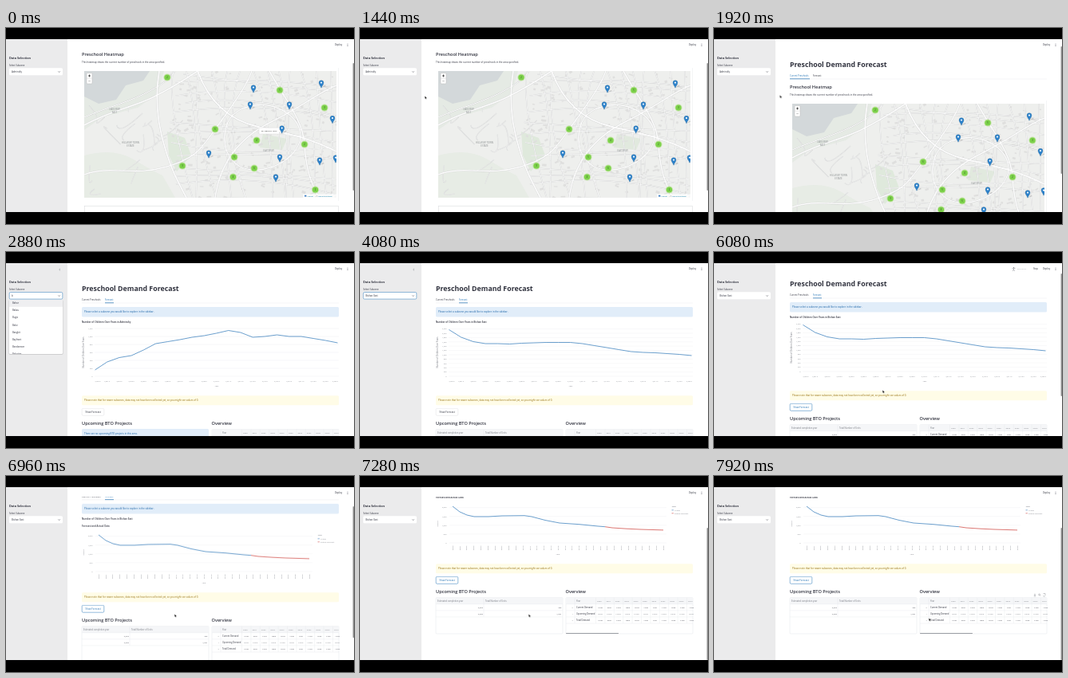
An HTML page for the animation above (8 s loop, 436 by 246 pixels).

```html
<!DOCTYPE html>
<html lang="en">
<head>
<meta charset="utf-8">
<title>Preschool dashboard</title>
<style>
  html, body { margin: 0; width: 100%; height: 100%; overflow: hidden; background: #000; }
  svg { display: block; width: 436px; height: 246px; }
  text { font-family: "Open Sans", "Noto Sans", sans-serif; white-space: pre; }
</style>
</head>
<body>
<svg id="stage" viewBox="0 0 436 246"></svg>
<script>
const LOOP = 8000, INK = '#31333f', BLUE = '#2272b4', GREY = '#777a82', RULE = '#e3e5e8';
const stage = document.getElementById('stage');

function add(parent, tag, attrs = {}, content) {
  const el = document.createElementNS('http://www.w3.org/2000/svg', tag);
  for (const key in attrs) el.setAttribute(key, attrs[key]);
  if (content !== undefined) el.textContent = content;
  parent.appendChild(el);
  return el;
}
const group = (parent, attrs) => add(parent, 'g', attrs);
const box = (parent, x, y, width, height, fill, more) =>
  add(parent, 'rect', { x, y, width, height, fill, ...more });
const path = (parent, d, stroke, width = 0.4, more) =>
  add(parent, 'path', { d, stroke, 'stroke-width': width, fill: 'none', ...more });
// y is the vertical middle of the text
const text = (parent, x, y, str, size = 2.8, fill = INK, more) =>
  add(parent, 'text', { x, y: y + size * 0.35, 'font-size': size, fill, ...more }, str);
const mid = { 'text-anchor': 'middle' }, end = { 'text-anchor': 'end' };
const bold = { 'font-weight': 700 }, semi = { 'font-weight': 600 };
const turned = (parent, x, y, str, size, fill) =>
  text(parent, 0, 0, str, size, fill, { ...mid, transform: `translate(${x} ${y}) rotate(-90)` });

function play(el, steps, easing = 'linear') {
  const list = steps.slice();
  if (list[0][0] > 0) list.unshift([0, list[0][1]]);
  if (list[list.length - 1][0] < LOOP) list.push([LOOP, list[list.length - 1][1]]);
  el.animate(list.map(([t, props]) => ({ offset: t / LOOP, easing, ...props })),
    { duration: LOOP, iterations: Infinity });
}
const move = (el, steps) =>
  play(el, steps.map(([t, x, y]) => [t, { transform: `translate(${x}px, ${y}px)` }]));
function show(el, ...spans) {
  const steps = spans[0][0] > 0 ? [[0, { opacity: 0 }]] : [];
  for (const [from, to] of spans) {
    steps.push([from, { opacity: 1 }]);
    if (to < LOOP) steps.push([to, { opacity: 0 }]);
  }
  play(el, steps, 'steps(1, end)');
}

let seed = 11;
const rand = () => (seed = (seed * 16807) % 2147483647) / 2147483647;
const jitter = n => (rand() - 0.5) * n;

box(stage, 77, 14, 359, 217, '#fff');
const page = group(stage);
move(page, [[0, 0, -41], [1600, 0, -41], [1760, 0, -17], [1920, 0, 0], [4240, 0, 0], [4720, 0, -5.5],
  [5120, 0, -5.5], [5920, 0, -6], [6840, 0, -6], [6960, 0, -34], [7200, 0, -70]]);

// Title and tabs
text(page, 95, 46, 'Preschool Demand Forecast', 8.8, INK, bold);
path(page, 'M95 64H417', RULE, 0.4);
for (const [from, to, on] of [[0, 2120, 0], [2120, LOOP, 1]]) {
  const tabs = group(page);
  text(tabs, 95, 60, 'Current Preschools', 2.65, on ? INK : BLUE);
  text(tabs, 124, 60, 'Forecast', 2.65, on ? BLUE : INK);
  path(tabs, on ? 'M124 63.8H135' : 'M95 63.8H120', BLUE, 0.7);
  show(tabs, [from, to]);
}

// Heatmap tab
function drawMap(parent) {
  const clip = add(add(stage, 'defs'), 'clipPath', { id: 'frame' });
  box(clip, 98, 54, 316, 159, '#000');
  const map = group(parent, { 'clip-path': 'url(#frame)' });
  box(map, 98, 54, 316, 159, '#eeefed');
  path(map, 'M98 54H198L190 82L165 100L120 112L98 128Z', 'none', 0, { fill: '#e5eae4' });
  path(map, 'M98 54H180L172 66L150 72L138 90L116 95L98 86Z', 'none', 0, { fill: '#d3d8da' });
  path(map, 'M98 160Q135 150 160 165T196 185L212 213H98Z', 'none', 0, { fill: '#e7ece5' });
  path(map, 'M202 130L224 138L232 160L214 180L204 160Z', 'none', 0, { fill: '#dfe9dc' });
  path(map, 'M322 133L352 139L346 153L318 150Z', 'none', 0, { fill: '#e1e9de' });

  for (let i = 0; i < 220; i++) {
    const x = 205 + rand() * 208, y = 55 + rand() * 157;
    box(map, x, y, 2 + rand() * 4, 1 + rand() * 2.2, '#dfdfde', { transform: `rotate(${jitter(70)} ${x} ${y})` });
  }
  const roads = [];
  const road = (d, w) => roads.push([d, w]);
  for (let i = 0; i < 13; i++) {
    const x = 212 + i * 16 + jitter(8), y = 56 + i * 13 + jitter(8);
    road(`M${x} 54Q${x + jitter(50)} ${110 + jitter(30)} ${x + 12 + jitter(30)} 213`, 0.8);
    road(`M${215 + jitter(20)} ${y}Q${310 + jitter(50)} ${y + jitter(50)} 414 ${y + 12 + jitter(20)}`, 0.8);
  }
  for (let i = 0; i < 16; i++) {
    const x = 100 + rand() * 92, y = 98 + rand() * 110;
    road(`M${x} ${y}q${jitter(30)} ${jitter(26)} ${8 + jitter(50)} ${jitter(44)}`, 0.5);
  }
  road('M98 122C130 104 160 99 184 87S222 66 240 54', 1.6);
  road('M98 112C125 100 158 92 182 78S206 62 212 54', 1);
  road('M192 54C186 88 190 120 199 150S214 190 226 213', 1.7);
  road('M98 184C130 172 158 186 198 175S244 152 262 127S300 76 308 54', 1.4);
  road('M240 54C254 92 280 116 316 124S380 138 414 155', 1.8);
  road('M262 213C268 170 292 138 332 118S390 82 414 72', 1.5);
  road('M330 54C350 90 372 116 374 146S380 190 392 213', 1.6);
  road('M278 118C290 92 340 88 362 116S350 176 316 178S266 150 278 118', 1.3);
  for (const [d, w] of roads) path(map, d, '#cfd0d0', w + 0.6);
  for (const [d, w] of roads) path(map, d, '#fcfcfc', w);

  const label = (x, y, ...lines) =>
    lines.forEach((s, i) => text(map, x, y + i * 4, s, 2.9, '#8b8f90', mid));
  label(136, 102, 'LAKEVIEW', 'EAST');
  label(156, 144, 'HILLVIEW TOWN', 'ESTATE');
  label(329, 154, 'EASTVIEW');

  const clusters = [[202, 62], [343, 78], [399, 100], [262, 127], [314, 141], [374, 146],
    [286, 162], [221, 173], [311, 176], [284.5, 187], [387.5, 203]];
  clusters.forEach(([x, y], i) => {
    add(map, 'circle', { cx: x, cy: y, r: 4.6, fill: '#b5e28c', opacity: 0.7 });
    add(map, 'circle', { cx: x, cy: y, r: 3.6, fill: '#6ecc39', opacity: 0.85 });
    text(map, x, y, 2 + i * 3 % 5, 2.6, '#2c4a1c', mid);
  });
  const pins = [[310, 76], [395, 70], [306, 97], [355, 97], [409, 114.5], [345.7, 127],
    [254, 158], [343, 163], [393, 167], [338, 188], [413, 164]];
  for (const [x, y] of pins) {
    const pin = group(map, { transform: `translate(${x} ${y})` });
    path(pin, 'M0 5L4.5 2L6 3Z', 'none', 0, { fill: '#777', opacity: 0.35 });
    path(pin, 'M0 5.2C-.8 2.4-2.9 1.2-2.9-1.4A2.9 2.9 0 0 1 2.9-1.4C2.9 1.2.8 2.4 0 5.2Z', '#1f6299', 0.4, { fill: '#2a81cb' });
    add(pin, 'circle', { cx: 0, cy: -1.4, r: 1.1, fill: '#fff' });
  }

  box(map, 101, 56.5, 7, 13.5, '#fff', { rx: 1, stroke: '#bbb', 'stroke-width': 0.5 });
  path(map, 'M101 63.2H108', '#ccc', 0.4);
  path(map, 'M103 60H106M104.5 58.5V61.5', '#222', 0.7);
  path(map, 'M103.2 66.6H105.8', '#999', 0.6);
  box(map, 372, 208.5, 42, 4.5, '#fff', { opacity: 0.8 });
  box(map, 374, 209.8, 2.4, 1.8, '#3f7fc4');
  text(map, 377.5, 210.7, 'Leaflet', 2.4, '#0078a8');
  text(map, 386.5, 210.7, '| ©', 2.4, '#555');
  text(map, 391, 210.7, 'OpenStreetMap', 2.4, '#0078a8');

  const tip = group(map);
  path(tip, 'M317 125.2H342.5V127.8L344.3 129.2L342.5 130.6V133H317Z', '#ccc', 0.3, { fill: '#fff' });
  text(tip, 329.8, 129.2, 'MY BRIGHT NEST', 2.5, '#222', mid);
  show(tip, [0, 220]);
}
const heat = group(page);
text(heat, 95, 74, 'Preschool Heatmap', 5.6, INK, semi);
text(heat, 95, 84.3, 'This heatmap shows the current number of preschools in the area specified.', 2.95);
drawMap(group(heat, { transform: 'translate(0 41)' }));
box(heat, 98.5, 264.5, 318, 30, '#fff', { stroke: '#d5d7da', 'stroke-width': 0.5 });
path(heat, 'M416.5 91V258', RULE, 0.4);
show(heat, [0, 2120]);

// Forecast tab
const demand = group(page);
show(demand, [2120, LOOP]);
box(demand, 95, 69, 322, 12.4, '#e1edf9', { rx: 1.5 });
text(demand, 98, 75.2, 'Please select a subzone you would like to explore in the sidebar.', 2.95, '#1560a5');

const line = (parent, points, color) =>
  path(parent, 'M' + points.map(p => p.join(' ')).join('L'), color, 0.75, { 'stroke-linejoin': 'round' });

function yearChart(parent, ticks, gap, ys) {
  const g = group(parent);
  for (let i = 0; i <= ticks; i++) {
    const y = 156 - i * gap;
    path(g, `M111 ${y}H417`, '#e9eaec', 0.35);
    text(g, 108.5, y, (i * 200).toLocaleString('en-US'), 2.2, GREY, end);
  }
  ys.forEach((y, i) => {
    const x = 111.5 + i * 15.2;
    text(g, Math.min(412.5, Math.max(115, x)), 162, `2,0${String(i).padStart(2, '0')}.0`, 2.1, GREY, mid);
  });
  turned(g, 97, 126, 'Number of Children Over Years', 2.7, GREY);
  text(g, 264, 168.3, 'Year', 2.4, GREY, mid);
  line(g, ys.map((y, i) => [111.5 + i * 15.2, y]), '#3a7fbd');
  return g;
}
const heading = (place, ...span) => show(
  text(demand, 95, 88.2, 'Number of Children Over Years in ' + place, 2.9, INK, semi), span);
heading('Admiralty', 2120, 3520);
heading('Bishan East', 3520, LOOP);
show(yearChart(demand, 6, 10, [148, 138, 132.5, 130, 123, 115, 112.5, 110, 107, 105, 102, 98.5,
  101, 107, 106, 104, 106, 106, 108.5, 111, 114]), [2120, 3520]);
show(yearChart(demand, 11, 5.4, [97.5, 107, 112.5, 115, 115, 115.5, 114.5, 114, 113.5, 113.5, 113.5, 115,
  117.5, 120, 122.5, 125, 126, 126.5, 127.5, 128.5, 130]), [3520, 6400]);

const result = group(demand);
show(result, [6400, LOOP]);
text(result, 95, 97.3, 'Forecast and Actual Data', 2.9, INK, semi);
for (let i = 0; i < 5; i++) {
  const y = 154 - i * 11.1;
  path(result, `M112 ${y}H384`, '#e9eaec', 0.35);
  text(result, 108.5, y, (i * 500).toLocaleString('en-US'), 2.3, GREY, end);
}
for (let i = 0; i <= 30; i++) turned(result, 116 + i * 8.8, 160.5, 2000 + i, 2.5, GREY);
turned(result, 97, 130, 'Count', 2.5, GREY);
text(result, 248, 168.5, 'Year', 2.5, GREY, mid);
line(result, [[116, 108], [125, 115], [134, 119], [143, 121], [161, 121], [178, 120], [206, 119.7], [215, 121],
  [232, 125.5], [250, 129], [275, 130.7], [298, 133], [307, 133.7]], '#3a7fbd');
line(result, [[307, 133.7], [316, 135], [334, 136.2], [351, 137], [380, 137.9]], '#cf4a44');
text(result, 390.5, 108.6, 'Type', 2.4, GREY, semi);
[['Actual', '#3a7fbd'], ['Future Forecast', '#cf4a44']].forEach(([name, color], i) => {
  path(result, `M390.5 ${112.8 + i * 4}h2.4`, color, 0.6);
  text(result, 394, 112.8 + i * 4, name, 2.4, GREY);
});

box(demand, 95, 180.2, 322, 12, '#fffce7', { rx: 1.5 });
text(demand, 98, 186.2, 'Please note that for newer subzones, data may not have been collected yet, so you might see values of 0.', 2.95, '#926c05');
for (const [color, edge, from, to] of [[INK, '#dcdde0', 2120, 5520], [BLUE, BLUE, 5520, LOOP]]) {
  const button = group(demand);
  box(button, 95.2, 196.3, 27.6, 9, '#fff', { rx: 1.4, stroke: edge, 'stroke-width': 0.5 });
  text(button, 109, 200.8, 'Show Forecast', 2.9, color, mid);
  show(button, [from, to]);
}

// Tables
text(demand, 95, 215, 'Upcoming BTO Projects', 5.6, INK, semi);
text(demand, 257.5, 215, 'Overview', 5.6, INK, semi);
const empty = group(demand);
box(empty, 95, 222, 159, 12.4, '#e1edf9', { rx: 1.5 });
text(empty, 98, 228.2, 'There are no upcoming BTO projects in this area.', 2.95, '#1560a5');
show(empty, [2120, 3520]);

function grid(parent, x, width, cols, rows) {
  box(parent, x, 222.6, width, 45.4, '#fff', { rx: 1, stroke: RULE, 'stroke-width': 0.5 });
  box(parent, x, 222.6, width, 8.2, '#f5f6f8');
  for (let i = 1; i <= rows + 1; i++) path(parent, `M${x} ${222.6 + i * 8.1}h${width}`, RULE, 0.35);
  for (const c of cols) path(parent, `M${c} 222.6V${230.7 + rows * 8.1}`, RULE, 0.35);
}
const units = group(demand);
grid(units, 95, 159, [155], 2);
text(units, 97, 226.7, 'Estimated completion year', 2.6, GREY);
text(units, 157, 226.7, 'Total Number of Units', 2.6, GREY);
[['2,024', '432'], ['2,025', '1,021']].forEach((row, i) => {
  text(units, 154, 235 + i * 8, row[0], 2.5, INK, end);
  text(units, 252.5, 235 + i * 8, row[1], 2.5, INK, end);
});
show(units, [3520, LOOP]);

const years = [...Array(11).keys()], colX = i => 295.5 + i * 11.4;
const overview = group(demand);
grid(overview, 258, 159, [269, ...years.map(colX)], 3);
text(overview, 271, 226.7, 'Year', 2.6, GREY);
for (const i of years) text(overview, colX(i) + 1.5, 226.7, 2000 + i, 2.5, GREY);
['Current Demand', 'Upcoming Demand', 'Total Demand'].forEach((name, r) => {
  const y = 235 + r * 8;
  text(overview, 267, y, r, 2.5, GREY, end);
  text(overview, 271, y, name, 2.6);
  for (const i of years)
    text(overview, colX(i) + 8.5, y, r === 1 ? 'None' : 2190 - Math.round(430 * (1 - Math.exp(-i / 2))), 2.5, r === 1 ? GREY : INK, end);
});
box(overview, 258, 267, 66, 1, '#9a9da3', { rx: 0.5 });
const tools = group(demand);
box(tools, 399, 216, 18, 6, '#fff', { rx: 1 });
path(tools, 'M402 217.5V220M400.9 219L402 220.2L403.1 219M400.8 221H403.2M412.5 217.5H415V220M412.5 220.5V221H415', GREY, 0.4);
add(tools, 'circle', { cx: 407.6, cy: 218.9, r: 1, fill: 'none', stroke: GREY, 'stroke-width': 0.4 });
path(tools, 'M408.4 219.7L409.3 220.7', GREY, 0.4);
show(tools, [7760, LOOP]);

// Header
box(stage, 77, 14, 357, 12, '#fff');
text(stage, 412, 21.5, 'Deploy', 2.8);
for (const y of [20, 21.4, 22.8]) add(stage, 'circle', { cx: 428, cy: y, r: 0.45, fill: INK });
const busy = group(stage);
add(busy, 'circle', { cx: 375.5, cy: 19.8, r: 0.7, fill: GREY });
path(busy, 'M373.4 20.8L375.5 21L377.6 20.2M375.5 21L375.3 22.6L374 24M375.3 22.6L377 23.8', GREY, 0.5);
text(busy, 380, 21.5, 'RUNNING...', 2.3, '#9a9ca3');
text(busy, 400, 21.5, 'Stop', 2.8);
show(busy, [3360, 3920], [5520, 6400]);

const thumb = box(stage, 434.6, 0, 1.4, 160, '#8c8c8c', { rx: 0.7 });
play(thumb, [[0, 44, 160], [1600, 44, 160], [1920, 23, 160], [2400, 23, 154], [4240, 23, 154], [4720, 27, 154],
  [6840, 27, 154], [6960, 38, 165], [7200, 65, 166]].map(([t, y, h]) => [t, { transform: `translate(0, ${y}px)`, height: h + 'px' }]));
show(thumb, [0, 2400], [4240, LOOP]);

// Sidebar
box(stage, 0, 14, 77, 217, '#ebebec');
text(stage, 4, 38, 'Data Selection', 3.75, INK, bold);
text(stage, 4, 47, 'Select Subzone', 2.75);
box(stage, 4, 50.3, 67, 9, '#fff', { rx: 1.5 });
const focus = box(stage, 4.2, 50.5, 66.6, 8.6, 'none', { rx: 1.5, stroke: BLUE, 'stroke-width': 0.5 });
show(focus, [2560, 5440]);
path(stage, 'M65.4 54.4L66.6 55.5L67.8 54.4', INK, 0.5);
const chevron = path(stage, 'M68 20.8L66.7 22.1L68 23.4', GREY, 0.5);
show(chevron, [880, 1360], [2320, 4400]);
for (const [str, ...spans] of [['Admiralty', [0, 2720]], ['b', [2720, 3040]], ['bi', [3040, 3120]],
  ['bish', [3120, 3360]], ['Bishan East', [3360, LOOP]]])
  show(text(stage, 7, 54.9, str, 2.9), ...spans);

function menu(items, from, to) {
  const g = group(stage), height = Math.min(68, items.length * 9.1 + 1);
  const clip = add(add(g, 'defs'), 'clipPath', { id: 'menu' + from });
  box(clip, 4, 60, 67, height, '#000', { rx: 1.5 });
  box(g, 3.4, 60, 68.2, height + 1, '#000', { rx: 1.8, opacity: 0.12 });
  const list = group(g, { 'clip-path': `url(#menu${from})` });
  box(list, 4, 60, 67, height, '#fff');
  box(list, 4, 60, 67, 8.8, '#efeff1');
  items.forEach((s, i) => text(list, 8, 64.2 + i * 9.12, s, 2.8));
  show(g, [from, to]);
}
menu(['Admiralty', 'Airport Road', 'Alexandra Hill', 'Aljunied', 'Anak Bukit', 'Anchorvale', 'Anson', 'Bahar'], 2560, 2720);
menu(['Bahar', 'Bakau', 'Bugis', 'Balai', 'Bangkit', 'Bayfront', 'Bendemeer', 'Balestier'], 2720, 3120);
menu(['Bishan East'], 3120, 3360);

box(stage, 0, 0, 436, 14, '#000');
box(stage, 0, 231, 436, 15, '#000');

const cursor = group(stage), arrow = group(cursor);
path(arrow, 'M-.8-1.8V2L.1 1.2L.8 2.5L1.5 2.1L.9 .9H2Z', '#fff', 0.35, { fill: '#111' });
move(cursor, [[160, 345, 128], [640, 170, 112], [880, 68, 64], [1040, 68, 64], [1200, 45, 56], [1440, 82, 87],
  [1920, 83, 86], [2080, 128, 61], [2160, 128, 61], [2400, 48, 55], [3360, 30, 64], [4240, 30, 64],
  [4640, 200, 152], [4880, 237.5, 184], [5120, 237.5, 184], [5440, 110, 195], [5600, 110, 195],
  [5920, 212, 175], [7280, 212, 175], [7680, 262, 177], [7760, 264, 178], [7920, 270, 180]]);
show(arrow, [160, 2720], [4240, LOOP]);
</script>
</body>
</html>
```
